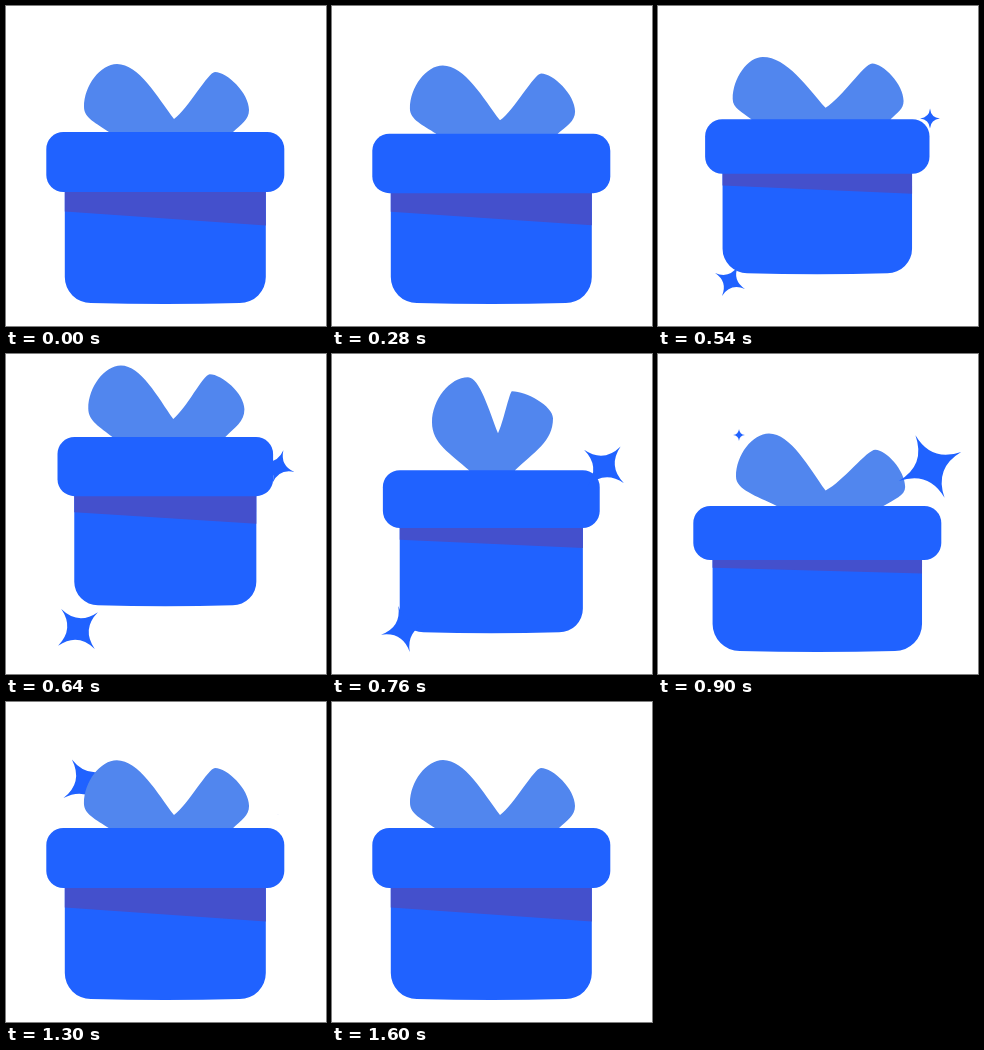
An HTML page with a canvas that plays this animation: 320x320 px, repeating every 1.64 s.

```html
<!DOCTYPE html>
<html lang="en">
<head>
<meta charset="utf-8">
<title>Gift box</title>
<style>
  html, body { margin: 0; height: 100%; overflow: hidden; background: #fff; }
  canvas { display: block; }
</style>
</head>
<body>
<canvas id="stage" width="320" height="320"></canvas>
<script>
const ctx = document.getElementById('stage').getContext('2d');
const LOOP = 1640, MID = 159.3, FLOOR = 297, HEIGHT = 171;
const BLUE = '#2062ff', LIGHT = '#5186ee', SHADE = '#4450cc';

// Loop poses: foot x, side x and y, top x and y, with y measured from the lid
const leftLoop = {
  rest: [103, 78, -25, 111, -68],
  up: [137, 100, -48, 136, -93],
  wide: [76, 71, -13, 98, -54]
};
const rightLoop = {
  rest: [227, 243, -22, 209, -60],
  up: [183, 221, -52, 180, -79],
  wide: [244, 248, -13, 219, -50]
};
const notch = { rest: [168, -13], up: [166, -37], wide: [167, -8] };

// Stars grow at a steady rate, stay at their largest, then shrink; spin is in degrees per ms
const cornerStar = { x: 72, y: 275, max: 26, start: 420, grow: .14, end: 900, shrink: .17, spin: .218, zero: 412 };
const rightStar = { x: 272, y: 112.5, max: 34.4, start: 405, grow: .073, end: 1304, shrink: .1, spin: .18, zero: 540 };
const leftStar = { x: 81, y: 81, max: 28, start: 820, grow: .074, end: 1600, shrink: .1, spin: .143, zero: 900 };

const smooth = u => (1 - Math.cos(Math.PI * u)) / 2;
const fall = u => 1 - (1 - u) ** 2;
const mix = (a, b, k) => a + (b - a) * k;

// Rises from 0 at a to 1 at peak, and is back to 0 at b
function bump(t, a, peak, b, ease = smooth) {
  const u = t < peak ? (t - a) / (peak - a) : (b - t) / (b - peak);
  return ease(Math.max(0, u));
}

function fill(color) {
  ctx.fillStyle = color;
  ctx.fill();
}

function boxPose(t) {
  const crouch = bump(t, 260, 400, 700), land = bump(t, 670, 900, 1040);
  const bottom = FLOOR - 46 * bump(t, 480, 630, 800, fall);
  return {
    bottom,
    lid: bottom - HEIGHT + 31 * crouch + 26 * land,
    lidHeight: 60 - 10 * crouch - 6 * land,
    width: 1 - .105 * bump(t, 340, 720, 880) + .042 * bump(t, 800, 900, 1040),
    shade: 1 - .73 * crouch - .6 * bump(t, 540, 900, 1040)
  };
}

function drawBox({ bottom, lid, lidHeight, width, shade }) {
  const left = MID - 100.5 * width, right = MID + 100.5 * width;
  const seam = lid + lidHeight, r = 26 * width;

  ctx.beginPath();
  ctx.moveTo(left, seam - 5);
  ctx.lineTo(right, seam - 5);
  ctx.arcTo(right, bottom, right - r, bottom, r);
  ctx.quadraticCurveTo(MID, bottom + 2, left + r, bottom);
  ctx.arcTo(left, bottom, left, bottom - r, r);
  fill(BLUE);

  ctx.beginPath();
  ctx.moveTo(left, seam - 5);
  ctx.lineTo(right, seam - 5);
  ctx.lineTo(right, seam + 33.5 * shade);
  ctx.lineTo(left, seam + 19.5 * shade);
  fill(SHADE);

  ctx.beginPath();
  ctx.roundRect(MID - 119 * width, lid, 238 * width, lidHeight, 17);
  fill(BLUE);
}

function drawBow(t, lid) {
  const up = bump(t, 580, 760, 900), droop = bump(t, 260, 470, 760);
  const leftWide = .55 * droop + bump(t, 900, 1040, 1320);
  const rightWide = .6 * droop + 1.1 * bump(t, 760, 970, 1320);
  const lift = 8 * bump(t, 260, 400, 580) + 4.5 * bump(t, 760, 900, 1040);
  const blend = (pose, wide) => pose.rest.map((v, i) =>
    v + up * (pose.up[i] - v) + wide * (pose.wide[i] - v));

  const [leftFoot, lx, ly, tx, ty] = blend(leftLoop, leftWide);
  const [rightFoot, rx, ry, ux, uy] = blend(rightLoop, rightWide);
  const [nx, ny] = blend(notch, (leftWide + rightWide) / 2);
  // Lifting the bow off the lid pulls its feet together
  const start = leftFoot + 3.5 * lift, end = rightFoot - 3.5 * lift;

  ctx.save();
  ctx.translate(0, lid - lift);
  ctx.beginPath();
  ctx.moveTo(start, lift + 2);
  ctx.lineTo(start, lift);
  ctx.bezierCurveTo(mix(start, lx, .5), mix(lift, ly, .35), lx, mix(lift, ly, .55), lx, ly);
  ctx.bezierCurveTo(lx, mix(ly, ty, .5), mix(tx, lx, .5), ty, tx, ty);
  ctx.bezierCurveTo(mix(tx, nx, .38), ty, mix(nx, tx, .29), mix(ny, ty, .4), nx, ny);
  ctx.bezierCurveTo(mix(nx, ux, .35), mix(ny, uy, .22), mix(ux, nx, .17), uy, ux, uy);
  ctx.bezierCurveTo(mix(ux, rx, .35), uy, rx, mix(ry, uy, .45), rx, ry);
  ctx.bezierCurveTo(rx, mix(lift, ry, .55), mix(end, rx, .5), mix(lift, ry, .35), end, lift);
  ctx.lineTo(end, lift + 2);
  fill(LIGHT);
  ctx.restore();
}

function drawStar(star, t) {
  const r = Math.min(star.max, star.grow * (t - star.start), star.shrink * (star.end - t));
  if (r <= 0) return;
  ctx.save();
  ctx.translate(star.x, star.y);
  ctx.rotate((t - star.zero) * star.spin * Math.PI / 180);
  ctx.scale(r, r);
  ctx.beginPath();
  ctx.moveTo(1, 0);
  for (let i = 0; i < 4; i++) {
    ctx.quadraticCurveTo(.09, .09, 0, 1);
    ctx.rotate(Math.PI / 2);
  }
  fill(BLUE);
  ctx.restore();
}

function draw(t) {
  const box = boxPose(t);
  ctx.clearRect(0, 0, 320, 320);
  drawStar(leftStar, t);
  drawBow(t, box.lid);
  drawBox(box);
  drawStar(cornerStar, t);
  drawStar(rightStar, t);
}

const begin = performance.now();
function tick() {
  draw((performance.now() - begin) % LOOP);
  requestAnimationFrame(tick);
}
tick();
</script>
</body>
</html>
```
